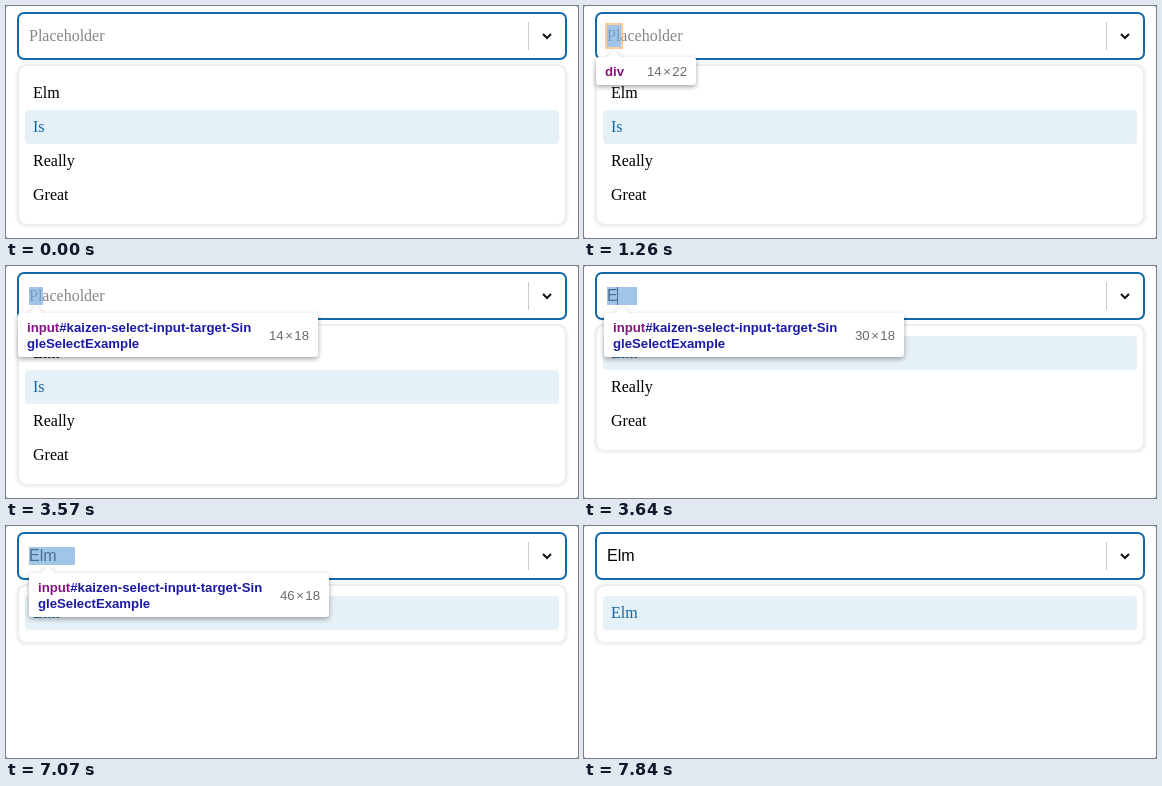
Recreate the animation shown at these times as an HTML page with a canvas. Size 572 by 232 pixels, loop 8.05 s.

```html
<!DOCTYPE html>
<html lang="en">
<head>
<meta charset="utf-8">
<title>Select filter</title>
<style>
html, body { margin: 0; width: 100%; height: 100%; overflow: hidden; background: #fff; }
canvas { display: block; width: 572px; height: 232px; }
</style>
</head>
<body>
<canvas id="stage"></canvas>
<script>
const W = 572, H = 232, LOOP = 8050;
const SERIF = '16px "Liberation Serif", Times, serif';
const SANS = '16px "Liberation Sans", Arial, sans-serif';
const TIP = '13.2px "Liberation Sans", Arial, sans-serif';
const BLUE = '#0f68a8';

const canvas = document.getElementById('stage');
const ctx = canvas.getContext('2d');
const dpr = window.devicePixelRatio || 1;
canvas.width = W * dpr;
canvas.height = H * dpr;

const between = (t, a, b) => t >= a && t < b;

// Typed value, matching options and input width over time
const typing = [
  { at: 0, value: '', options: ['Elm', 'Is', 'Really', 'Great'], active: 1, width: 14, tipX: 12, arrowX: 30 },
  { at: 3640, value: 'E', options: ['Elm', 'Really', 'Great'], active: 0, width: 30, tipX: 20, arrowX: 38 },
  { at: 4480, value: 'El', options: ['Elm'], active: 0, width: 38, tipX: 23, arrowX: 42 },
  { at: 5320, value: 'Elm', options: ['Elm'], active: 0, width: 46, tipX: 23, arrowX: 42 }
];

// Times at which the caret flips, starting hidden
const blinks = [700, 1260, 1750, 2310, 2800, 3360, 3640, 4200, 4480, 5040, 5320, 5810, 6300, 6790, 7280, 7840];
const caretOn = t => blinks.filter(b => b <= t).length % 2 === 1;

function text(str, x, y, font, color, align = 'left') {
  ctx.font = font;
  ctx.fillStyle = color;
  ctx.textAlign = align;
  ctx.fillText(str, x, y);
  return ctx.measureText(str).width;
}

function box(x, y, w, h, r, fill) {
  ctx.beginPath();
  ctx.roundRect(x, y, w, h, r);
  ctx.fillStyle = fill;
  ctx.fill();
}

function rect(x, y, w, h, fill) {
  ctx.fillStyle = fill;
  ctx.fillRect(x, y, w, h);
}

function drawControl(state, caret) {
  box(11, 6, 550, 48, 7, BLUE);
  box(13, 8, 546, 44, 5, '#fff');
  rect(522, 16, 1, 28, '#ccc');

  ctx.beginPath();
  ctx.moveTo(537, 28);
  ctx.lineTo(541, 32);
  ctx.lineTo(545, 28);
  ctx.strokeStyle = '#111';
  ctx.lineWidth = 2;
  ctx.stroke();

  let width = 0;
  if (state.value) width = text(state.value, 23, 35, SANS, '#000');
  else text('Placeholder', 23, 35, SERIF, '#868686');
  if (caret) rect(Math.floor(23 + width), 21, 1, 18, '#000');
}

function drawMenu(state) {
  const h = 24 + state.options.length * 34;
  box(9, 57, 554, h + 5, 11, '#fafafa');
  box(10, 58, 552, h + 3, 10, '#f4f4f4');
  box(11.5, 58.5, 549, h + 1, 9, '#ececec');
  box(13, 60, 546, h - 2, 8, '#fff');
  state.options.forEach((label, i) => {
    const y = 70 + i * 34;
    const active = i === state.active;
    if (active) box(19, y, 534, 34, 4, '#e6f0f7');
    text(label, 27, y + 22, SERIF, active ? BLUE : '#000');
  });
}

function drawBubble(x, y, w, h, arrowX) {
  ctx.save();
  ctx.shadowColor = 'rgba(0,0,0,.35)';
  ctx.shadowBlur = 5 * dpr;
  ctx.shadowOffsetY = 2 * dpr;
  ctx.beginPath();
  ctx.roundRect(x, y, w, h, 3);
  ctx.moveTo(arrowX - 8, y + 1);
  ctx.lineTo(arrowX, y - 7);
  ctx.lineTo(arrowX + 8, y + 1);
  ctx.fillStyle = '#fff';
  ctx.fill();
  ctx.restore();
}

function drawSize(w, h, right, y) {
  const color = '#6b6b6b';
  const hw = text(String(h), right, y, TIP, color, 'right');
  const xw = text('×', right - hw - 1.5, y, TIP, color, 'right');
  text(String(w), right - hw - xw - 3, y, TIP, color, 'right');
}

function drawDivTip() {
  ctx.fillStyle = 'rgba(246,178,107,.66)';
  ctx.beginPath();
  ctx.rect(21, 17, 18, 26);
  ctx.rect(23, 19, 14, 22);
  ctx.fill('evenodd');
  rect(23, 19, 14, 22, 'rgba(111,168,220,.66)');
  drawBubble(12, 51, 100, 28, 30);
  text('div', 21, 70, 'bold ' + TIP, '#881280');
  drawSize(14, 22, 103, 70);
}

function drawInputTip({ width, tipX, arrowX }) {
  const bold = 'bold ' + TIP;
  rect(23, 21, width, 18, 'rgba(111,168,220,.66)');
  drawBubble(tipX, 47, 300, 44, arrowX);
  const w = text('input', tipX + 9, 66, bold, '#881280');
  text('#kaizen-select-input-target-Sin', tipX + 9 + w, 66, bold, '#1a1aa6');
  text('gleSelectExample', tipX + 9, 82, bold, '#1a1aa6');
  drawSize(width, 18, tipX + 291, 74);
}

function draw(t) {
  const state = typing.filter(s => s.at <= t).pop();
  ctx.setTransform(dpr, 0, 0, dpr, 0, 0);
  rect(0, 0, W, H, '#fff');
  for (const x of [0, W - 1]) for (const y of [0, H - 1]) rect(x, y, 1, 1, '#999');
  drawMenu(state);
  drawControl(state, caretOn(t));
  if (between(t, 1120, 1750)) drawDivTip();
  if (between(t, 1960, 7140)) drawInputTip(state);
}

const start = performance.now();
function frame() {
  draw((performance.now() - start) % LOOP);
  requestAnimationFrame(frame);
}
frame();
</script>
</body>
</html>
```
